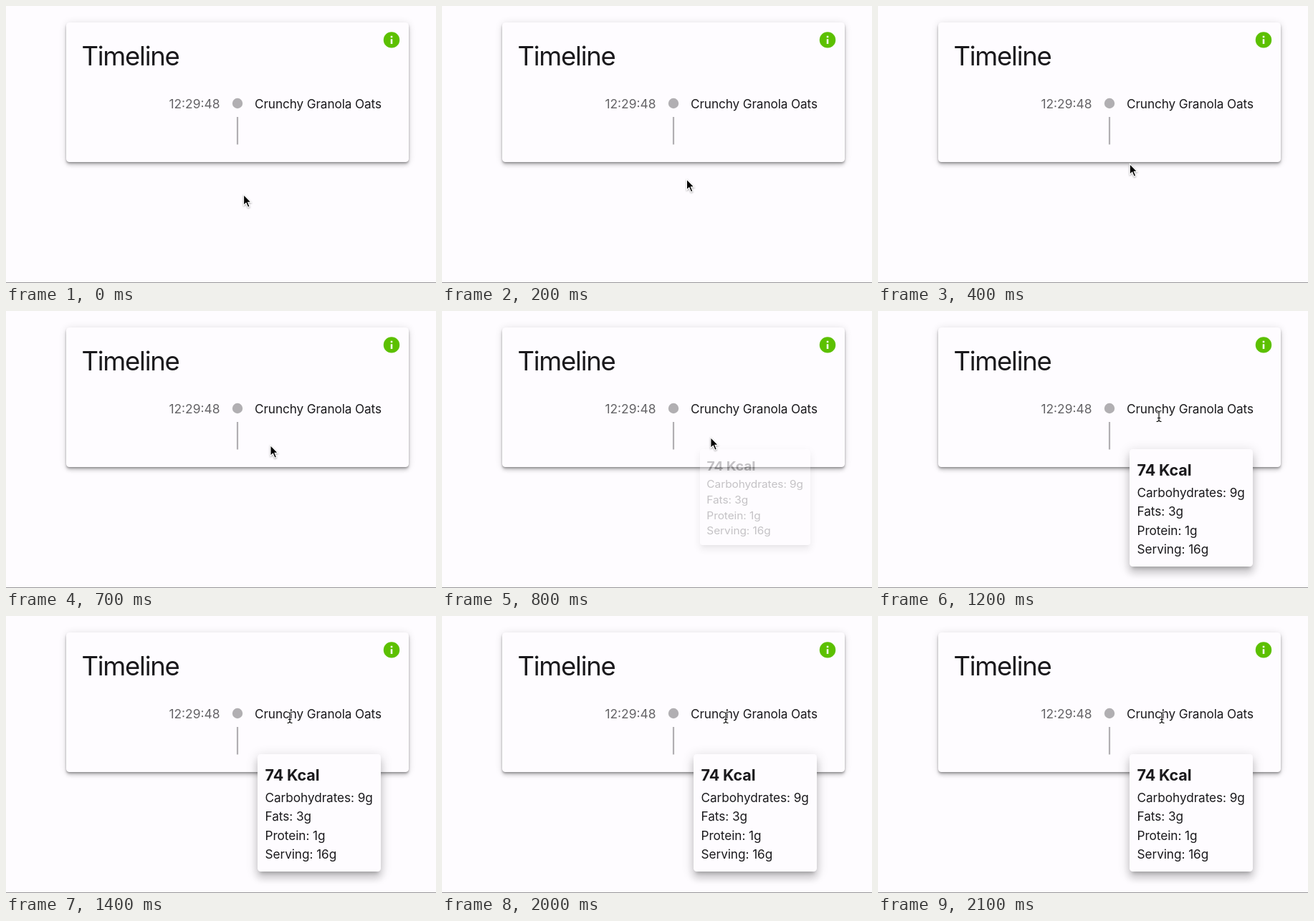
Animation of 600x387 px, one loop 3.7 s. Source, as an HTML page:

```html
<!DOCTYPE html>
<html lang="en">
<head>
<meta charset="utf-8">
<title>Timeline</title>
<style>
  html, body { margin: 0; width: 100%; height: 100%; overflow: hidden; background: #fefcff; }
  div, svg { position: absolute; }
  svg { left: 0; top: 0; overflow: visible; }
  text { font: 17.2px Inter, sans-serif; font-optical-sizing: none; letter-spacing: -.1px; fill: #1a191c; }
  #stage { left: 0; top: 0; width: 600px; height: 387px; overflow: hidden; }
  .paper { background: #fefcff; border-radius: 4.4px; }
  #card {
    left: 84px; top: 23px; width: 478px; height: 194.7px;
    box-shadow: 0 2px 3px -.5px #0005, 0 4.4px 5.5px #00000024, 0 1.1px 11px #0000001f;
  }
  #tip {
    left: 351px; top: 193px; width: 171.5px; height: 163.5px; transform-origin: 50% 0;
    box-shadow: 0 5.5px 5.5px -3.3px #0003, 0 8.9px 11px 1.1px #00000024, 0 3.3px 15.5px 2.2px #0000001f;
  }
  #facts text { letter-spacing: -.05px; }
  #facts .head { font-size: 21.5px; font-weight: 700; letter-spacing: -.12px; }
  .title { font-size: 36.5px; letter-spacing: -1.27px; }
  .time { font-size: 17.4px; letter-spacing: 0; fill: #646366; }
</style>
</head>
<body>
<div id="stage">
  <div id="card" class="paper"></div>
  <svg width="600" height="387">
    <text class="title" x="105.5" y="83">Timeline</text>
    <text class="time" x="227.4" y="142.8">12:29:48</text>
    <text x="347" y="142.8">Crunchy Granola Oats</text>
    <circle cx="323" cy="136" r="7.2" fill="#b1afb2"/>
    <path d="M323 155V193.5" stroke="#b1afb2" stroke-width="2.2"/>
    <circle cx="538" cy="47.4" r="11.2" fill="#5cc000"/>
    <path d="M538 41.8v2.4M538 46.2V53" stroke="#fff" stroke-width="2.5"/>
    <path d="M0 386.5H600" stroke="#98979a"/>
  </svg>
  <div id="tip" class="paper">
    <svg id="facts" width="172" height="164">
      <text class="head" x="10.6" y="37.1">74 Kcal</text>
    </svg>
  </div>
  <svg width="600" height="387">
    <g id="arrow" style="filter:drop-shadow(0 1px 1px #0005)">
      <path d="M.6 .6V15.4L4 12.3l2.6 6 2.5-1.1-2.5-5.8h4.5Z" stroke="#fff" stroke-width="1.1"/>
    </g>
    <g id="beam" fill="none">
      <path id="bar" d="M-3.5-7.5Q0-7.5 0-5V5Q0 7.5-3.5 7.5M3.5-7.5Q0-7.5 0-5M0 5Q0 7.5 3.5 7.5M-2.2 2.5H2.2" stroke="#fff" stroke-width="2.8"/>
    </g>
  </svg>
</div>
<script>
const LOOP = 3700, STEP = 100;
const $ = id => document.getElementById(id);
const clamp = v => Math.min(1, Math.max(0, v));

["Carbohydrates: 9g", "Fats: 3g", "Protein: 1g", "Serving: 16g"].forEach((line, i) => {
  const el = document.createElementNS("http://www.w3.org/2000/svg", "text");
  el.setAttribute("x", 10.5);
  el.setAttribute("y", 66.5 + i * 26.5);
  el.textContent = line;
  $("facts").append(el);
});

// The beam's black core sits over its white outline.
const core = $("bar").cloneNode();
core.removeAttribute("id");
core.setAttribute("stroke", "#111");
core.setAttribute("stroke-width", 1.2);
$("beam").append(core);

// Pointer hot spot: time, x, y
const path = [
  [0, 331, 263], [400, 350.7, 220], [800, 374.3, 176], [900, 380.5, 162.5],
  [1000, 385.5, 156], [1200, 392, 147], [1400, 396, 142]
];

function pointer(t) {
  const i = path.findIndex(p => p[0] > t);
  if (i < 0) return path[path.length - 1].slice(1);
  const [a, b] = [path[i - 1], path[i]];
  const k = (t - a[0]) / (b[0] - a[0]);
  return [1, 2].map(n => a[n] + (b[n] - a[n]) * k);
}

// cubic-bezier(.4, 0, .2, 1)
function ease(x) {
  let lo = 0, hi = 1;
  for (let i = 0; i < 24; i++) {
    const s = (lo + hi) / 2, r = 1 - s;
    if (1.2 * s * r * r + .6 * s * s * r + s ** 3 < x) lo = s; else hi = s;
  }
  return 3 * lo * lo * (1 - lo) + lo ** 3;
}

function draw(t) {
  const [x, y] = pointer(t);
  const overText = t >= 1100;
  $("arrow").style.display = overText ? "none" : "";
  $("beam").style.display = overText ? "" : "none";
  $(overText ? "beam" : "arrow").setAttribute("transform", `translate(${x} ${y})`);

  const age = t - 733;
  const grow = ease(clamp(age / 174));
  $("tip").style.opacity = ease(clamp(age / 262));
  $("tip").style.transform = `scale(${.75 + .25 * grow}, ${.5625 + .4375 * grow})`;
}

const start = performance.now();
function tick() {
  const t = (performance.now() - start) % LOOP;
  draw(Math.floor(t / STEP) * STEP);
  requestAnimationFrame(tick);
}
tick();
</script>
</body>
</html>
```
